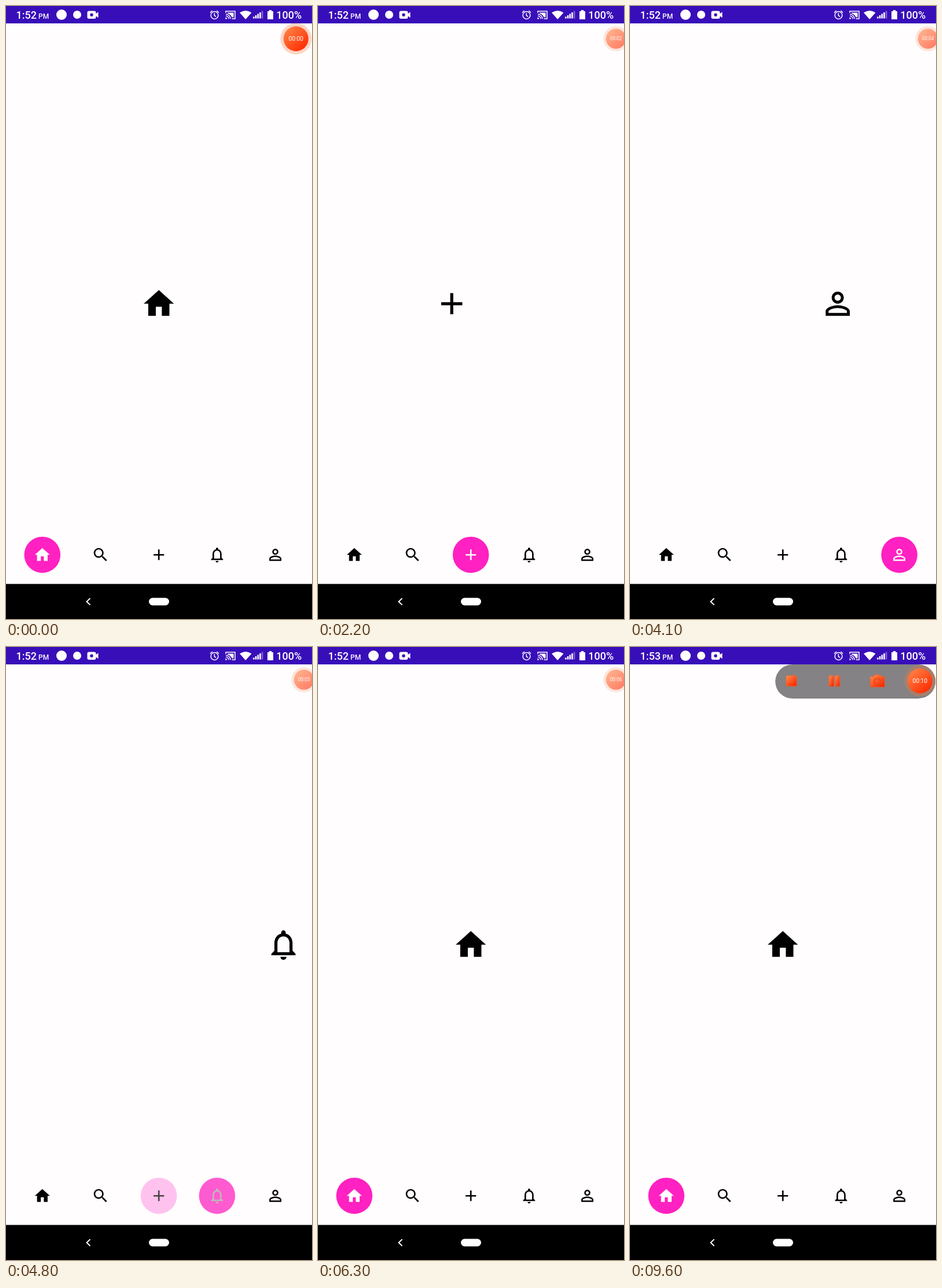
Recreate the animation shown at these times as an HTML page. Size 529 by 1058 pixels, loop 9900 ms.

```html
<!DOCTYPE html>
<html lang="en">
<head>
<meta charset="utf-8">
<title>Swipe navigation</title>
<style>
  html, body { margin: 0; width: 100%; height: 100%; overflow: hidden; background: #fffdfe; }
  svg { display: block; width: 100%; height: 100%; font-family: Roboto, sans-serif; }
</style>
</head>
<body>
<svg viewBox="0 0 529 1058">
  <defs>
    <linearGradient id="hot" x1="0.1" y1="0.1" x2="0.8" y2="0.9">
      <stop offset="0" stop-color="#ff8144"/>
      <stop offset="1" stop-color="#ff2f05"/>
    </linearGradient>
    <filter id="glow" x="-40%" y="-40%" width="180%" height="180%">
      <feDropShadow dx="0" dy="0" stdDeviation="1.6" flood-color="#ff5a20" flood-opacity=".7"/>
    </filter>
    <clipPath id="pillClip"><rect id="pillMask" y="30" height="59" rx="29.5"/></clipPath>
  </defs>

  <rect width="529" height="1058" fill="#fffdfe"/>
  <g id="pages"></g>
  <g id="tabs"></g>

  <g id="system-bar">
    <rect y="997.5" width="529" height="60.5"/>
    <path d="M145.5 1022.3 139.5 1028l6 5.700" fill="none" stroke="#fff" stroke-width="1.9"/>
    <rect x="247" y="1021.500" width="35" height="13" rx="6.500" fill="#fff"/>
  </g>

  <g id="status" fill="#fff">
    <rect width="529" height="30" fill="#380eb9"/>
    <text id="clock" x="17.500" y="22" font-size="18" font-weight="500"></text>
    <text x="56" y="22" font-size="12" font-weight="500">PM</text>
    <circle cx="96" cy="15" r="9"/>
    <circle cx="123" cy="15" r="7"/>
    <path d="M143.500 8.500h9q3 0 3 3v1.800l4-3v10l-4-3v1.700q0 3-3 3h-9q-3 0-3-3v-7.500q0-3 3-3z"/>
    <circle cx="148" cy="15.200" r="2.700" fill="#380eb9"/>
    <g fill="none" stroke="#fff" stroke-width="1.500">
      <circle cx="360.500" cy="16" r="6.400"/>
      <path d="M360.300 12v4.500l3 1.800M352.800 11.500l4-3.500M368.200 11.500l-4-3.500"/>
      <path d="M380 12V9h16v13h-5.500M380 14.200a8 8 0 0 1 8 8M380 17.300a5 5 0 0 1 5 5"/>
    </g>
    <path d="M379.300 19.800a2.700 2.700 0 0 1 2.700 2.700h-2.700zM383 11.500h10.500v8h-3a10 10 0 0 0-7.500-6.500z"/>
    <path d="M404 11.500Q414.200 4.500 424.500 11.500L414.200 23z"/>
    <g id="signal"></g>
    <path d="M452 9h2.800V7h4.400v2h2.800v14h-10z"/>
    <text x="467.300" y="22" font-size="18" font-weight="500">100%</text>
  </g>

  <g id="pill" clip-path="url(#pillClip)">
    <rect x="251" y="30" width="277.500" height="59" rx="29.500" fill="#848284"/>
    <g fill="url(#hot)" filter="url(#glow)">
      <rect x="270" y="49.500" width="18" height="18" rx="1.500"/>
      <rect x="344" y="49.500" width="8" height="18.500" rx="1"/>
      <rect x="354.500" y="49.500" width="8" height="18.500" rx="1"/>
      <path d="M416.500 51h5l2-3h8.500l2 3h5q1 0 1 1v16q0 1-1 1h-22.500q-1 0-1-1V52q0-1 1-1z"/>
      <circle cx="427.700" cy="60" r="5.800" fill="none" stroke="#d9481c" stroke-width="1.500"/>
    </g>
  </g>

  <g id="bubble">
    <circle r="27" fill="#f5783c" fill-opacity=".3"/>
    <circle r="21.500" fill="url(#hot)"/>
    <text id="timer" y="3.700" font-size="10.300" fill="#fff" text-anchor="middle"></text>
    <circle id="dot" cx="-7.500" r="4.800" fill="#ff4d0c"/>
  </g>
</svg>
<script>
const LOOP = 9900, STEP = 100, WIDTH = 529, DP = 1.305;
const ICONS = [
  'M10 20v-6h4v6h5v-8h3L12 3 2 12h3v8z',
  'M15.5 14h-.79l-.28-.27C15.41 12.59 16 11.11 16 9.5 16 5.91 13.09 3 9.5 3S3 5.91 3 9.5 5.91 16 9.5 16c1.61 0 3.09-.59 4.23-1.57l.27.28v.79l5 4.99L20.49 19l-4.99-5zm-6 0C7.01 14 5 11.99 5 9.5S7.01 5 9.5 5 14 7.01 14 9.5 11.99 14 9.5 14z',
  'M19 13h-6v6h-2v-6H5v-2h6V5h2v6h6z',
  'M12 22c1.1 0 2-.9 2-2h-4c0 1.1.89 2 2 2zm6-6v-5c0-3.07-1.64-5.64-4.5-6.32V4c0-.83-.67-1.5-1.5-1.5s-1.5.67-1.5 1.5v.68C7.63 5.36 6 7.92 6 11v5l-2 2v1h16v-1l-2-2zm-2 1H8v-6c0-2.48 1.51-4.5 4-4.5s4 2.02 4 4.5v6z',
  'M12 5.9c1.16 0 2.1.94 2.1 2.1s-.94 2.1-2.1 2.1S9.9 9.16 9.9 8s.94-2.1 2.1-2.1m0 9c2.97 0 6.1 1.46 6.1 2.1v1.1H5.9V17c0-.64 3.13-2.1 6.1-2.1M12 4C9.79 4 8 5.79 8 8s1.79 4 4 4 4-1.79 4-4-1.79-4-4-4zm0 9c-2.67 0-8 1.34-8 4v3h16v-3c0-2.66-5.33-4-8-4z'
];

// start, end, page step, drag exponent
const SWIPES = [
  [0, 700, 1, 2], [1200, 1800, 1, 2], [2100, 2700, 1, 2.15], [3000, 3500, 1, 2],
  [4000, 4500, -1, 1.71], [4600, 5100, -1, 2], [5100, 5700, -1, 2], [5700, 6300, -1, 2]
];
const TICKS = [600, 1600, 2600, 3500, 4500, 5600, 6600, 7600, 8600, 9600];

// time, x, y, scale, opacity, dot amount
const BUBBLE = [
  [1400, 501.3, 56.5, 1, 1, 0], [1700, 515, 56.5, .8, .6, 0],
  [6400, 515, 56.5, .8, .6, 0], [6900, 528.5, 56.5, 1, .6, 1],
  [8300, 528.5, 56.5, 1, .6, 1], [8700, 501.3, 58.5, 1, 1, 0]
];

const $ = id => document.getElementById(id);
const clamp = v => Math.min(1, Math.max(0, v));
const span = (t, a, b) => clamp((t - a) / (b - a));

function add(parent, tag, attrs) {
  const el = document.createElementNS('http://www.w3.org/2000/svg', tag);
  for (const key in attrs) el.setAttribute(key, attrs[key]);
  return parent.appendChild(el);
}

const place = (x, y, k) => `translate(${x} ${y}) scale(${k}) translate(-12 -12)`;

const pages = ICONS.map(d => add($('pages'), 'path', { d }));
const tabs = ICONS.map((d, i) => {
  const cx = 62.8 + 100.7 * i;
  return {
    disc: add($('tabs'), 'circle', { cx, cy: 947.2, r: 31.3, fill: '#ff21c1' }),
    icon: add($('tabs'), 'path', { d, transform: place(cx, 947.2, DP) })
  };
});
for (let i = 0; i < 5; i++) {
  const h = 3 + 2.5 * i;
  add($('signal'), 'rect', { x: 427 + 3.7 * i, y: 21.5 - h, width: 2.6, height: h, opacity: i < 4 ? 1 : .35 });
}

// Finger drag picks up speed, then the page settles
function pageAt(t) {
  return SWIPES.reduce((page, [a, b, dir, drag]) =>
    page + dir * (1 - (1 - span(t, a, b) ** drag) ** 3), 0);
}

function bubbleAt(t) {
  const next = BUBBLE.findIndex(k => t < k[0]);
  if (next < 0) return BUBBLE[BUBBLE.length - 1];
  const to = BUBBLE[next], from = BUBBLE[next - 1] || to;
  const u = span(t, from[0], to[0]);
  const e = u * u * (3 - 2 * u);
  return from.map((v, i) => v + (to[i] - v) * e);
}

function draw(t) {
  const page = pageAt(t);
  ICONS.forEach((_, i) => {
    pages[i].setAttribute('transform', place(264.2 + (i - page) * WIDTH, 513.8, 2 * DP));
    const active = clamp(1 - (Math.abs(page - i) - .3) / .4);
    const level = Math.round(255 * active);
    tabs[i].disc.setAttribute('opacity', active);
    tabs[i].icon.setAttribute('fill', `rgb(${level},${level},${level})`);
  });

  $('clock').textContent = t < 7800 ? '1:52' : '1:53';
  const seconds = TICKS.filter(s => s <= t).length;
  $('timer').textContent = '00:' + String(seconds).padStart(2, '0');

  const [, x, y, scale, opacity, dot] = bubbleAt(t);
  $('bubble').setAttribute('transform', `translate(${x} ${y}) scale(${scale})`);
  $('bubble').setAttribute('opacity', opacity);
  $('timer').setAttribute('opacity', 1 - dot);
  $('dot').setAttribute('opacity', dot);

  const open = 1 - (1 - span(t, 8700, 9200)) ** 2;
  const width = 59 + 218.5 * open;
  $('pillMask').setAttribute('x', 528.5 - width);
  $('pillMask').setAttribute('width', width);
  $('pill').setAttribute('visibility', open > 0 ? 'visible' : 'hidden');
}

const began = performance.now();
function loop() {
  const t = (performance.now() - began) % LOOP;
  draw(Math.floor(t / STEP) * STEP);
  requestAnimationFrame(loop);
}
loop();
</script>
</body>
</html>
```
